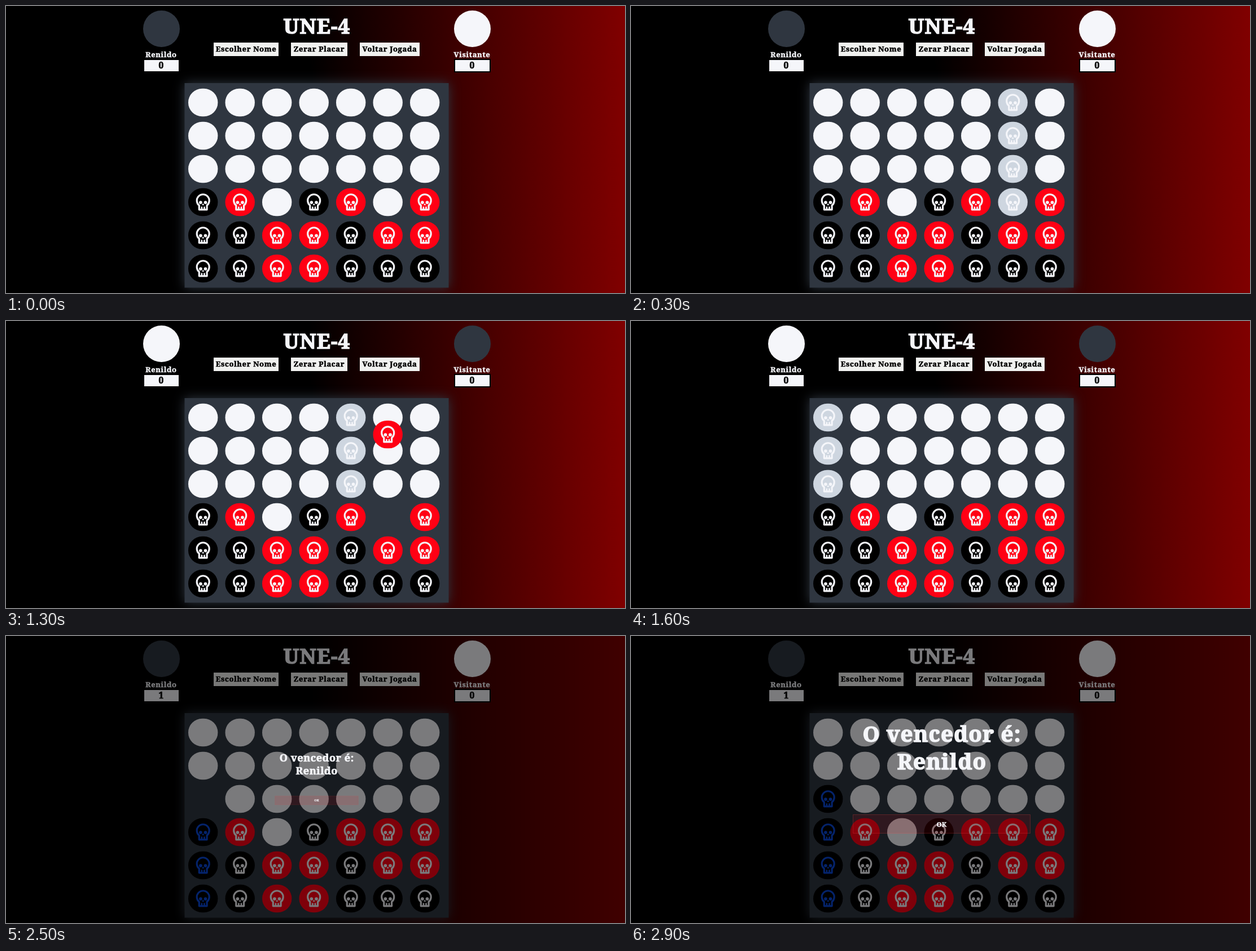
These frames come from a looping animation (1097 px wide and 510 px high, 4 s). An HTML page:

```html
<!DOCTYPE html>
<html lang="pt">
<head>
<meta charset="utf-8">
<style>
  html, body { margin: 0; height: 100%; overflow: hidden; background: #000; }
  svg { display: block; width: 100vw; height: 100vh; }
  text {
    font-family: "Noto Serif", serif; font-weight: 900; text-anchor: middle;
    letter-spacing: .03em; stroke: #000; stroke-width: .04em;
  }
  #board { fill: #2f3640; filter: drop-shadow(0 0 10px #2f3640); }
  .light { fill: #f5f6fa; }
  text.light { stroke: #f5f6fa; }
  .small { font-size: 13px; letter-spacing: .05em; }
  .small text { letter-spacing: inherit; }
  .score { font-size: 15.5px; }
  .title { font-size: 37px; }
  .big { font-size: 38.5px; }
</style>
</head>
<body>
<svg viewBox="0 0 1097 510">
  <defs>
    <linearGradient id="night">
      <stop offset=".49" stop-color="#000"/>
      <stop offset="1" stop-color="#800000"/>
    </linearGradient>
    <g id="skull" fill="none" stroke="currentColor" stroke-width="3.2">
      <path d="M5.6 21.2A11 11 0 1 1 19.4 21.2V28.7H5.6Z" stroke-linejoin="round"/>
      <path d="M10.2 23.5V29M14.8 23.5V29" stroke-width="2.6"/>
      <g fill="currentColor" stroke="none">
        <circle cx="8.2" cy="16" r="2.9"/>
        <circle cx="16.8" cy="16" r="2.9"/>
        <path d="M12.5 17.5L14.5 21H10.5Z"/>
      </g>
    </g>
  </defs>

  <rect width="1097" height="510" fill="url(#night)"/>
  <circle id="home" cx="275.5" cy="40.5" r="32.5"/>
  <circle id="guest" cx="826.5" cy="40.5" r="32.5"/>
  <text class="small light" x="275" y="90.5">Renildo</text>
  <text class="small light" x="826" y="90.5">Visitante</text>
  <g class="light" stroke="#000" stroke-width="2">
    <rect x="244" y="95" width="63" height="22"/>
    <rect x="795" y="95" width="63" height="22"/>
  </g>
  <text id="points" class="score" x="275" y="110.5"></text>
  <text class="score" x="826" y="110.5">0</text>

  <text class="title light" x="551" y="48.5">UNE-4</text>
  <g fill="#f1f2f0">
    <rect x="368" y="65" width="115" height="24"/>
    <rect x="505" y="65" width="100" height="24"/>
    <rect x="627" y="65" width="106" height="24"/>
  </g>
  <g class="small">
    <text x="425.5" y="81">Escolher Nome</text>
    <text x="555" y="81">Zerar Placar</text>
    <text x="680" y="81">Voltar Jogada</text>
  </g>

  <rect id="board" x="316.5" y="137" width="468" height="363.5"/>
  <g id="cells"></g>

  <g id="win">
    <rect width="1097" height="510" opacity=".5"/>
    <g id="modal">
      <text class="big light" x="551" y="187.5">O vencedor é:</text>
      <text class="big light" x="551" y="236.5">Renildo</text>
      <rect x="393.5" y="317.5" width="314" height="33" fill="#ff0014" fill-opacity=".1"
            stroke="#f44" stroke-opacity=".5" stroke-dasharray="1 1"/>
      <text class="light" font-size="11.5" x="550.5" y="338.5">OK</text>
    </g>
  </g>
</svg>

<script>
const $ = id => document.getElementById(id);
const LOOP = 4000, STEP = 100, FALL = 500, HEIGHT = 1130;
const BONE = '#f5f6fa', SLATE = '#2f3640';
const rows = ['.......', '.......', '.......', 'KR.KR.R', 'KKRRKRR', 'KKRRKKK'];
const fills = { '.': BONE, H: '#ced6e0', K: '#000', R: '#ff0014' };
// Drops: cell, piece, moment it is clicked
const drops = [
  { row: 3, col: 5, piece: 'R', at: 865 },
  { row: 2, col: 0, piece: 'K', at: 2265 },
];
// Hovered column from each moment on
const hovers = [[0, -1], [100, 6], [300, 5], [1300, 4], [1400, 2], [1500, 1], [1600, 0], [2300, -1]];

const cells = rows.map((line, row) => [...line].map((_, col) => {
  const g = document.createElementNS('http://www.w3.org/2000/svg', 'g');
  g.innerHTML = '<rect width="52.4" height="49.4" rx="24.5"/><use href="#skull" x="13.7" y="9.3"/>';
  $('cells').append(g);
  return { g, disc: g.firstChild, skull: g.lastChild, row, col };
}));

// Falling pieces pass in front of the rest
drops.forEach(d => $('cells').append(cells[d.row][d.col].g));

function paint(cell, kind, lift, won) {
  const { g, disc, skull, row, col } = cell;
  g.setAttribute('transform', `translate(${323 + 65.5 * col} ${146.8 + 59 * row - lift})`);
  disc.setAttribute('fill', fills[kind]);
  skull.style.display = kind === '.' ? 'none' : '';
  skull.style.color = won ? '#0846d8' : BONE;
}

function draw(t) {
  const hover = hovers.findLast(h => t >= h[0])[1];
  const over = t >= drops[1].at;
  const homeTurn = t >= drops[0].at && !over;

  for (const cell of cells.flat()) {
    const { row, col } = cell;
    const drop = drops.find(d => d.row === row && d.col === col && t >= d.at);
    let kind = rows[row][col], lift = 0;
    if (drop) {
      kind = drop.piece;
      lift = HEIGHT * Math.max(0, 1 - (t - drop.at) / FALL);
    } else if (kind === '.' && col === hover) kind = 'H';
    paint(cell, kind, lift, over && col === 0 && row > 1);
  }

  $('home').setAttribute('fill', homeTurn ? BONE : SLATE);
  $('guest').setAttribute('fill', homeTurn ? SLATE : BONE);
  $('points').textContent = over ? 1 : 0;
  $('win').style.display = over ? '' : 'none';
  const scale = Math.max(0, Math.min(1, (t - drops[1].at) / FALL));
  $('modal').setAttribute('transform',
    `translate(550.5 255) scale(${scale}) translate(-550.5 -255)`);
}

const start = performance.now();
function tick() {
  const t = (performance.now() - start) % LOOP;
  draw(Math.floor(t / STEP) * STEP);
  requestAnimationFrame(tick);
}
tick();
</script>
</body>
</html>
```
